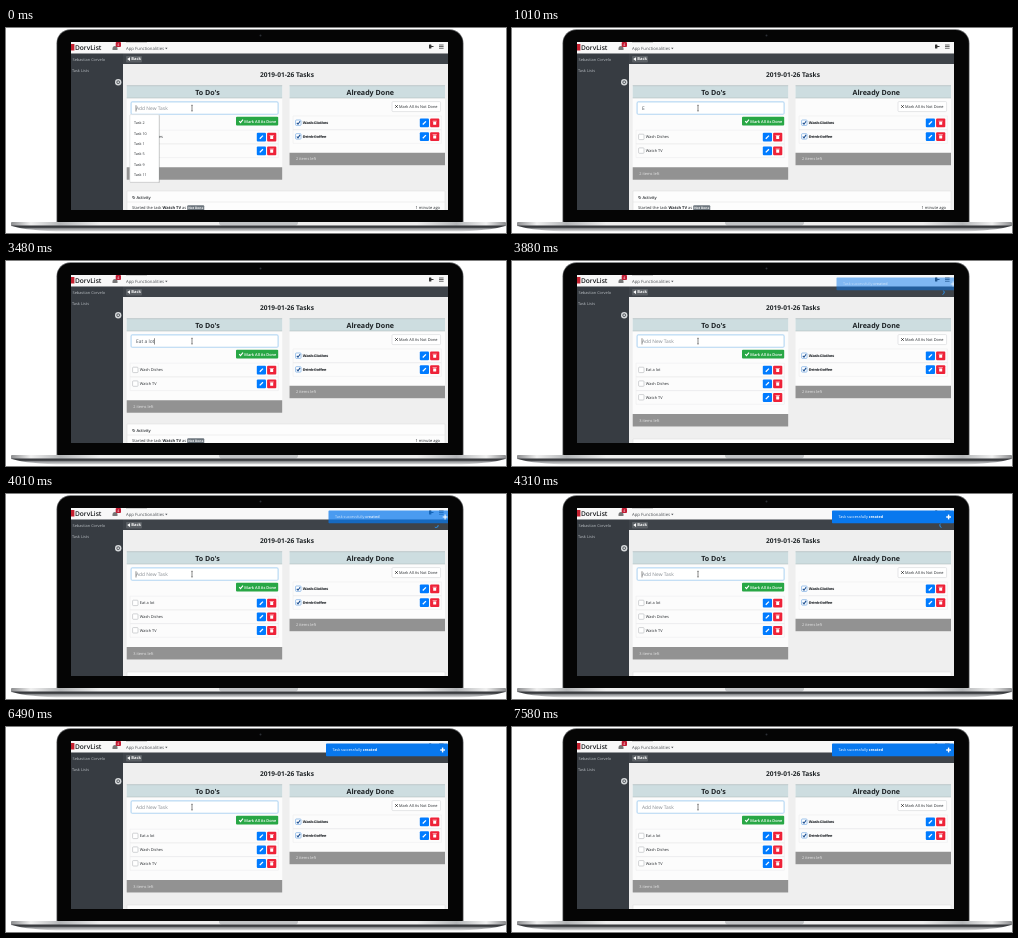
An HTML page with a canvas that plays this animation: 500 by 205 pixels, repeating every 8000 ms.

```html
<!DOCTYPE html>
<html lang="en">
<head>
<meta charset="utf-8">
<title>Task list on a laptop</title>
<style>
  html, body { margin: 0; width: 100%; height: 100%; overflow: hidden; background: #fff; }
  canvas { display: block; width: 500px; height: 205px; }
</style>
</head>
<body>
<canvas id="stage"></canvas>
<script>
const W = 500, H = 205, LOOP = 8000;
const SANS = '"Open Sans", "Noto Sans", sans-serif';
const BLUE = '#007bff', RED = '#ee2238', GREEN = '#28a745', DARK = '#373c42', INK = '#24282c';
const SUBMIT = 3880, ROW = 13.7;

const canvas = document.getElementById('stage');
const ctx = canvas.getContext('2d');
const dpr = window.devicePixelRatio || 1;
canvas.width = W * dpr;
canvas.height = H * dpr;

// [start time, typed text, caret visible]
const typing = [
  [0, '', true], [260, '', false], [510, 'E', true], [1010, 'E', false],
  [1430, '', true], [1580, 'E', true], [1720, 'Ea', true], [1980, 'Eat', false],
  [2100, 'Eat', true], [2630, 'Eat ', true], [2780, 'Eat a', true], [3060, 'Eat a ', true],
  [3210, 'Eat a l', true], [3330, 'Eat a lo', true], [3480, 'Eat a lot', true],
  [SUBMIT, '', true], [4430, '', false], [4890, '', true], [5420, '', false],
  [5930, '', true], [6490, '', false], [6990, '', true], [7580, '', false]
];

// [start time, opacity, shift to the right]
const toastSteps = [[SUBMIT, 0.5, 4.5], [4010, 0.72, 2.5], [4160, 0.88, 1], [4310, 1, 0]];

const stepAt = (steps, t) => steps.filter(s => s[0] <= t).pop();

function rect(x, y, w, h, fill, r = 0) {
  ctx.fillStyle = fill;
  ctx.beginPath();
  ctx.roundRect(x, y, w, h, r);
  ctx.fill();
}

function frame(x, y, w, h, color, r = 0, width = 0.6) {
  ctx.strokeStyle = color;
  ctx.lineWidth = width;
  ctx.beginPath();
  ctx.roundRect(x, y, w, h, r);
  ctx.stroke();
}

function line(points, color, width = 0.7) {
  ctx.strokeStyle = color;
  ctx.lineWidth = width;
  ctx.beginPath();
  points.forEach(([x, y], i) => i ? ctx.lineTo(x, y) : ctx.moveTo(x, y));
  ctx.stroke();
}

// Text centred vertically on y; returns its width
function text(str, x, y, size, color, { weight = 400, align = 'left' } = {}) {
  ctx.font = `${weight} ${size}px ${SANS}`;
  ctx.fillStyle = color;
  ctx.textAlign = align;
  ctx.fillText(str, x, y + size * 0.36);
  return ctx.measureText(str).width;
}

function gradient(x0, y0, x1, y1, stops) {
  const g = ctx.createLinearGradient(x0, y0, x1, y1);
  stops.forEach(([p, c]) => g.addColorStop(p, c));
  return g;
}

function laptop() {
  rect(50.5, 1.2, 407, 194, '#66686a', [14, 14, 2, 2]);
  rect(51.2, 1.9, 405.6, 193, '#050505', [13.5, 13.5, 2, 2]);
  rect(253.5, 6.6, 2, 2, '#2c3036', 1);

  const metal = gradient(5, 0, 500, 0, [
    [0, '#8c8d8f'], [0.04, '#f0f0f0'], [0.1, '#b4b6b8'], [0.18, '#eee'],
    [0.82, '#eee'], [0.9, '#b4b6b8'], [0.96, '#f0f0f0'], [1, '#8c8d8f']
  ]);
  rect(5, 194, 495, 4.2, metal, 1);
  rect(213, 194, 79, 3.4, '#c3c5c7', [0, 0, 3, 3]);

  ctx.fillStyle = gradient(0, 197.6, 0, 203.5, [
    [0, '#34363a'], [0.3, '#3f4144'], [0.5, '#8f9194'], [1, '#e6e6e6']
  ]);
  ctx.beginPath();
  ctx.moveTo(5, 197.6);
  ctx.lineTo(500, 197.6);
  ctx.quadraticCurveTo(490, 202, 455, 203.5);
  ctx.lineTo(50, 203.5);
  ctx.quadraticCurveTo(15, 202, 5, 197.6);
  ctx.fill();
}

function header() {
  rect(65, 14, 377, 11.5, '#f8f8f8');
  rect(65, 16, 3.4, 6.5, '#c4202f');
  text('DorvList', 69, 19.5, 6.6, '#15171a', { weight: 600 });
  rect(106.5, 18, 5, 4, '#777', [2.5, 2.5, 0, 0]);
  rect(109.7, 14, 5.3, 5, '#c01c33', 1);
  text('4', 112.3, 16.6, 3.6, '#fff', { align: 'center' });
  rect(120, 14, 21, 0.8, '#c8c8c8');
  const w = text('App Functionalities', 120, 20.3, 4.3, '#4c5054');
  ctx.fillStyle = '#4c5054';
  ctx.beginPath();
  ctx.moveTo(121 + w, 19.8);
  ctx.lineTo(123.4 + w, 19.8);
  ctx.lineTo(122.2 + w, 21.2);
  ctx.fill();

  rect(423, 16.5, 2.4, 4, '#333', 0.5);
  line([[424.5, 18.5], [427.5, 18.5]], '#333', 1);
  for (let i = 0; i < 3; i++) rect(433, 16.6 + i * 1.6, 4.6, 0.8, '#444');
}

function sidebar() {
  rect(65, 25.5, 52, 157, DARK);
  text('Sebastian Corvelo', 66.5, 32, 3.9, '#b9bec3');
  text('Task Lists', 66, 43, 3.9, '#b9bec3');
  rect(109, 51, 6.4, 6.4, '#d5d8da', 3.2);
  ctx.strokeStyle = '#555a5f';
  ctx.lineWidth = 1;
  ctx.beginPath();
  ctx.arc(112.2, 54.2, 1.4, 0, 7);
  ctx.stroke();
  rect(117, 25.5, 325, 10.5, '#3e4349');
  rect(120, 28, 16, 6.4, '#5a5f64', 1);
  ctx.fillStyle = '#fff';
  ctx.beginPath();
  ctx.moveTo(121.2, 31.1);
  ctx.lineTo(124, 29.3);
  ctx.lineTo(124, 32.9);
  ctx.fill();
  text('Back', 125.3, 31, 4, '#fff', { weight: 700 });
}

function checkbox(x, y, checked) {
  rect(x, y - 2.8, 5.4, 5.4, '#fff', 0.8);
  frame(x, y - 2.8, 5.4, 5.4, checked ? '#5d9ade' : '#b3b6b9', 0.8);
  if (checked) line([[x + 1.2, y], [x + 2.4, y + 1.4], [x + 4.5, y - 1.6]], '#1c4f91', 1.1);
}

function rowButtons(x, y) {
  rect(x, y - 4.3, 9.2, 8.8, BLUE, 1);
  line([[x + 3, y + 1.7], [x + 6.1, y - 1.4]], '#fff', 1.3);
  rect(x + 10.3, y - 4.3, 9.2, 8.8, RED, 1);
  rect(x + 13.4, y - 1.1, 3, 3.1, '#fff', 0.3);
  rect(x + 12.8, y - 2, 4.2, 0.6, '#fff');
}

function task(name, x, y, buttonX, done) {
  const left = x - 2.5, right = buttonX + 21.5;
  frame(left, y - ROW / 2, right - left, ROW, '#e8e9ea', 0, 0.5);
  checkbox(x, y, done);
  const w = text(name, x + 7.2, y, 3.9, INK, { weight: done ? 600 : 400 });
  if (done) line([[x + 7.2, y + 0.3], [x + 7.2 + w, y + 0.3]], INK, 0.6);
  rowButtons(buttonX, y);
}

function card(x, bottom, title, left) {
  const w = 155.5;
  rect(x, 57.5, w, bottom - 57.5, '#fcfcfc');
  rect(x, 57.5, w, 12.5, '#cddde0');
  line([[x, 57.7], [x + w, 57.7]], '#9fa9ab', 0.5);
  line([[x, 70], [x + w, 70]], '#a6b1b3', 0.5);
  text(title, x + w / 2 + 3, 64, 7.1, '#1c2124', { weight: 700, align: 'center' });
  rect(x, bottom - 12.5, w, 12.5, '#929292');
  text(left, x + 6.5, bottom - 6.3, 3.9, '#e6e6e6');
}

function input(value, caret) {
  frame(125.2, 74, 146.8, 12.2, 'rgba(0,123,255,.12)', 1.5, 1.8);
  rect(125.2, 74, 146.8, 12.2, '#fff', 1);
  frame(125.2, 74, 146.8, 12.2, '#a3cdec', 1, 0.7);
  if (!value) text('Add New Task', 130, 80.3, 4.9, '#858b91');
  const w = value ? text(value, 130, 80.3, 4.9, '#495057') : 0;
  if (caret) rect(129.7 + w, 77.3, 0.6, 6.2, '#444');
}

function suggestions() {
  rect(124, 87, 30, 68, 'rgba(0,0,0,.16)', 1);
  rect(123.8, 86.6, 29.2, 67.6, '#fff', 1);
  frame(123.8, 86.6, 29.2, 67.6, '#cfd1d3', 1, 0.5);
  [2, 10, 1, 5, 9, 11].forEach((n, i) => text('Task ' + n, 128, 94.8 + i * 10.4, 3.7, INK));
}

function activity(y) {
  rect(121, y, 318, 30, '#fdfdfd');
  frame(121, y, 318, 30, '#d9dadb', 0, 0.5);
  text('↻ Activity', 126, y + 6.2, 4, INK, { weight: 600 });
  line([[121, y + 11], [439, y + 11]], '#dcdddd', 0.5);
  let x = 126 + text('Started the task ', 126, y + 16.8, 4, INK);
  x += text('Watch TV', x, y + 16.8, 4, INK, { weight: 700 });
  x += text(' as ', x, y + 16.8, 4, INK);
  rect(x, y + 14.2, 17, 5.4, '#6c757d', 1);
  text('Not Done', x + 8.5, y + 16.8, 3.2, '#fff', { weight: 700, align: 'center' });
  text('1 minute ago', 434, y + 16.8, 4, INK, { align: 'right' });
}

function pointer() {
  line([[186, 77.4], [186, 82.8]], '#3c3c3c', 0.6);
  for (const y of [77.3, 82.9]) line([[185, y], [187, y]], '#3c3c3c', 0.5);
}

function spinner(t) {
  ctx.strokeStyle = '#2a9bff';
  ctx.lineWidth = 0.9;
  ctx.beginPath();
  const a = t / 160;
  ctx.arc(430, 31.3, 2.2, a, a + 2.2);
  ctx.stroke();
}

function toast(t) {
  const step = stepAt(toastSteps, t);
  if (!step) return;
  if (t < 4740) spinner(t);
  const [, alpha, shift] = step;
  ctx.save();
  ctx.globalAlpha = alpha;
  ctx.translate(shift, 0);
  rect(320, 16.6, 122, 12.6, '#0878ee', 0.8);
  const w = text('Task successfully ', 326.5, 23, 3.75, '#fff');
  text('created', 326.5 + w, 23, 3.75, '#fff', { weight: 700 });
  rect(434.2, 22.3, 4.8, 1.4, '#fff');
  rect(435.9, 20.6, 1.4, 4.8, '#fff');
  ctx.restore();
}

function todoCard(t) {
  const names = ['Wash Dishes', 'Watch TV'];
  if (t >= SUBMIT) names.unshift('Eat a lot');
  const [, value, caret] = stepAt(typing, t);
  card(120.7, 151.7 + (names.length - 2) * ROW, "To Do's", names.length + ' items left');
  input(value, caret);
  rect(230, 88.8, 42.2, 8.8, GREEN, 1);
  line([[233.2, 93.2], [234.5, 94.6], [237, 91.6]], '#fff', 1.1);
  text('Mark All As Done', 238.3, 93.2, 3.9, '#fff', { weight: 600 });
  names.forEach((name, i) => task(name, 126.6, 109 + i * ROW, 250.8, false));
  if (t < 510) suggestions();
}

function doneCard() {
  card(283.5, 137.3, 'Already Done', '2 items left');
  rect(386, 73.6, 48.6, 10, '#fff', 1);
  frame(386, 73.6, 48.6, 10, '#d3d5d8', 1);
  line([[389.4, 77.4], [391.6, 79.6]], '#222', 1);
  line([[391.6, 77.4], [389.4, 79.6]], '#222', 1);
  text('Mark All As Not Done', 393, 78.5, 3.9, INK);
  ['Wash Clothes', 'Drink Coffee'].forEach((name, i) => task(name, 289.6, 94.8 + i * ROW, 413.8, true));
}

function draw(t) {
  ctx.setTransform(dpr, 0, 0, dpr, 0, 0);
  ctx.textRendering = 'geometricPrecision';
  ctx.fillStyle = '#fff';
  ctx.fillRect(0, 0, W, H);
  laptop();
  ctx.save();
  ctx.beginPath();
  ctx.rect(65, 14, 377, 168);
  ctx.clip();
  rect(65, 14, 377, 168, '#efefef');
  header();
  sidebar();
  text('2019-01-26 Tasks', 281, 47, 6.6, '#1f2427', { weight: 700, align: 'center' });
  activity(t < SUBMIT ? 163 : 178);
  todoCard(t);
  doneCard();
  pointer();
  toast(t);
  ctx.restore();
}

const start = performance.now();
function tick() {
  draw((performance.now() - start) % LOOP);
  requestAnimationFrame(tick);
}
tick();
</script>
</body>
</html>
```
